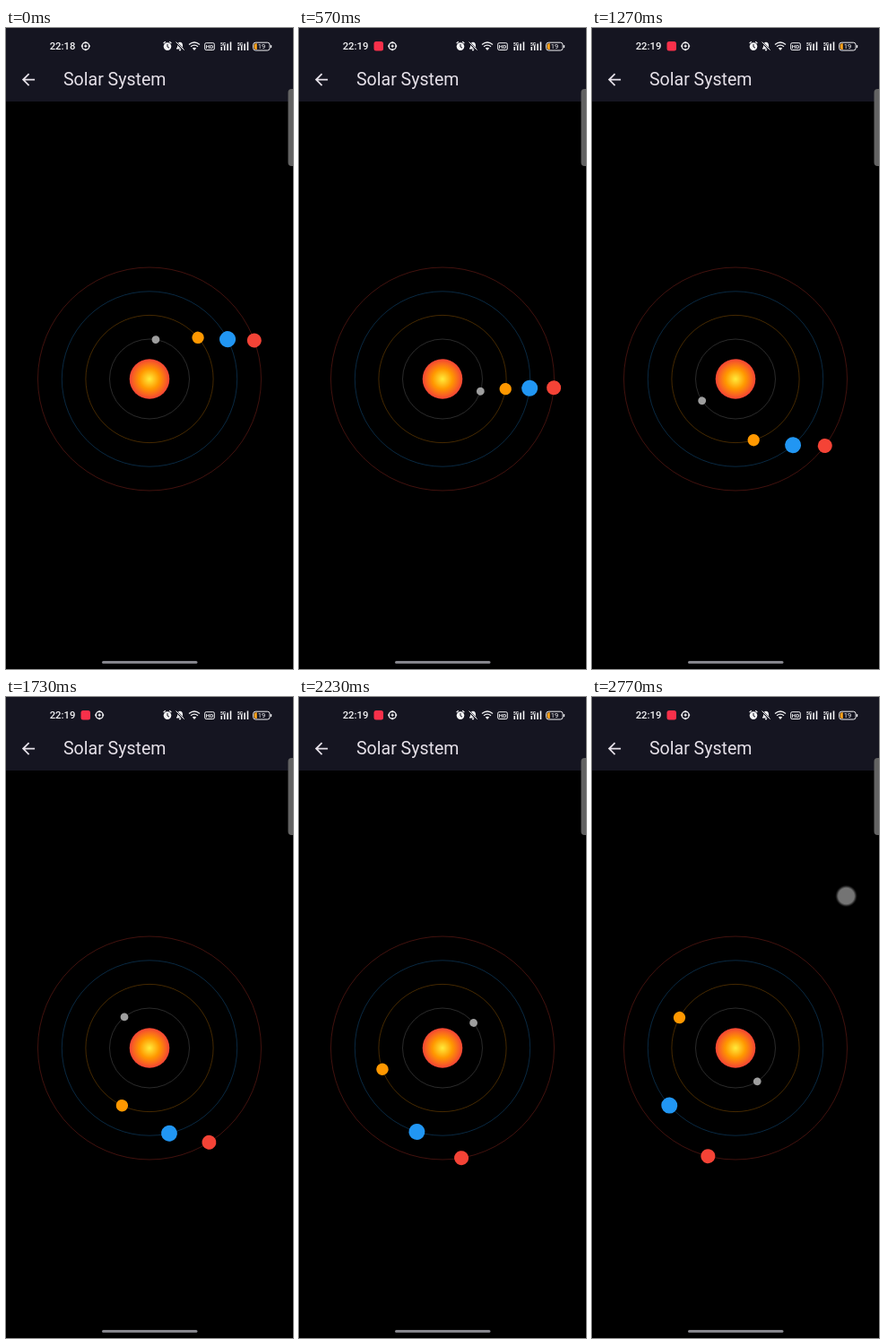
Recreate the animation shown at these times as an HTML page. Size 320 px wide and 715 px high, loop 2.81 s.

```html
<!DOCTYPE html>
<html lang="en">
<head>
<meta charset="utf-8">
<title>Solar System</title>
<style>
html, body { margin: 0; height: 100%; overflow: hidden; background: #000; }
svg { display: block; width: 100vw; height: 100vh; font-family: Roboto, sans-serif; }
.line { fill: none; stroke: #f4f4f6; }
</style>
</head>
<body>
<svg viewBox="0 0 320 715">
  <defs>
    <radialGradient id="sun">
      <stop offset="0" stop-color="#ffeb3b"/>
      <stop offset=".5" stop-color="#ff9800"/>
      <stop offset="1" stop-color="#f44336"/>
    </radialGradient>
    <radialGradient id="dot">
      <stop offset=".7" stop-color="#747474"/>
      <stop offset=".8" stop-color="#4a4a4a"/>
      <stop offset="1" stop-color="#181818" stop-opacity="0"/>
    </radialGradient>
    <g id="signal">
      <text x="-6.5" y="19.6" font-size="5" font-weight="700">5G</text>
      <path d="M-6 21h1.6v4h-1.6zM-2.6 20h1.6v5h-1.6zM.8 17.5h1.6v7.5h-1.6zM4.2 15.5h1.6v9.5h-1.6z"/>
    </g>
  </defs>

  <rect width="320" height="82" fill="#151521"/>
  <g fill="#f4f4f6">
    <text id="clock" x="48.7" y="24.4" font-size="11.3" font-weight="500"></text>
    <rect id="badge" x="83.5" y="15" width="10.5" height="10.5" rx="2.5" fill="#f8304a"/>
    <g id="target" class="line">
      <circle cy="20.2" r="4" stroke-width="1.4"/>
      <path d="M0 15.2v2M0 23.2v2M-5 20.2h2M3 20.2h2M-1.6 20.2h3.2M0 18.6v3.2" stroke-width="1.2"/>
    </g>

    <circle cx="180" cy="20.6" r="4.3"/>
    <path class="line" d="M175.6 17l2.2-1.8M184.4 17l-2.2-1.8" stroke-width="1.2"/>
    <path d="M180 18v3l2 1.2" fill="none" stroke="#151521"/>

    <path d="M190 23.4v-1l1-1v-2.2q.2-3 3-3.4 2.8.4 3 3.4v2.2l1 1v1zM193 24h2v1.2h-2z"/>
    <path d="M189.6 16l9 9" stroke="#151521" stroke-width="2.4"/>
    <path class="line" d="M189.6 15.6l9 9"/>

    <path class="line" d="M204 18.4q6-4.8 12 0M206 20.8q4-3.2 8 0" stroke-width="1.3"/>
    <path d="M207.8 22.6q2.2-1.5 4.4 0l-2.2 2.4z"/>

    <rect class="line" x="221.7" y="16.7" width="10.6" height="7.8" rx="1.5"/>
    <text x="227" y="22.9" font-size="6.2" font-weight="700" text-anchor="middle">HD</text>
    <use href="#signal" x="245.5"/>
    <use href="#signal" x="264.5"/>

    <rect class="line" x="275.7" y="16.2" width="18.4" height="8.8" rx="2.6"/>
    <path d="M279.8 17.2h-1.2q-1.9 0-1.9 1.9v3q0 1.9 1.9 1.9h1.2z" fill="#ffa21a"/>
    <rect x="295" y="19" width="1.2" height="3.2" rx=".6"/>
    <text x="285" y="23.3" font-size="7.6" text-anchor="middle">19</text>
  </g>

  <g fill="#e6e1e9">
    <path transform="translate(14.3 46.9) scale(.889)" d="M20 11H7.83l5.59-5.59L12 4l-8 8 8 8 1.41-1.41L7.83 13H20z"/>
    <text x="64" y="64.2" font-size="19.56">Solar System</text>
  </g>
  <path d="M320 68h-1.5q-4 0-4 4v78q0 4 4 4h1.5z" fill="#636363"/>
  <rect x="107" y="706" width="106.5" height="3" rx="1.5" fill="#85858c"/>

  <g id="system" transform="translate(160 391.5)">
    <circle r="22.3" fill="url(#sun)"/>
  </g>
  <circle id="touch" cx="283.5" cy="222" r="12.5" fill="url(#dot)"/>
</svg>
<script>
const LOOP = 2810, STEP = 100 / 3;
const $ = id => document.getElementById(id);

// orbit radius, planet radius, colour
const planets = [
  [44.5, 4.4, '#9e9e9e'],
  [71.1, 6.7, '#ff9800'],
  [97.7, 9, '#2196f3'],
  [124.5, 8, '#f44336']
];

function circle(attrs) {
  const el = document.createElementNS('http://www.w3.org/2000/svg', 'circle');
  for (const key in attrs) el.setAttribute(key, attrs[key]);
  $('system').append(el);
  return el;
}

for (const [r, , stroke] of planets) {
  circle({ r, stroke, fill: 'none', 'stroke-width': 0.9, 'stroke-opacity': 0.3 });
}
const bodies = planets.map(([cx, r, fill]) => circle({ cx, r, fill }));

function draw(now) {
  const t = now % LOOP;
  const n = Math.floor((t + 3.4) / STEP);
  const angle = 6 * n - 81 - (n > 0 && n < 34 ? 3 : 0);
  bodies.forEach((el, i) => el.setAttribute('transform', `rotate(${angle / (i + 1)})`));

  const late = t >= 300;
  $('clock').textContent = late ? '22:19' : '22:18';
  $('badge').style.display = late ? '' : 'none';
  $('target').setAttribute('transform', `translate(${late ? 104.2 : 88.8} 0)`);
  $('touch').style.display = t >= 2600 ? '' : 'none';
  requestAnimationFrame(draw);
}
requestAnimationFrame(draw);
</script>
</body>
</html>
```
